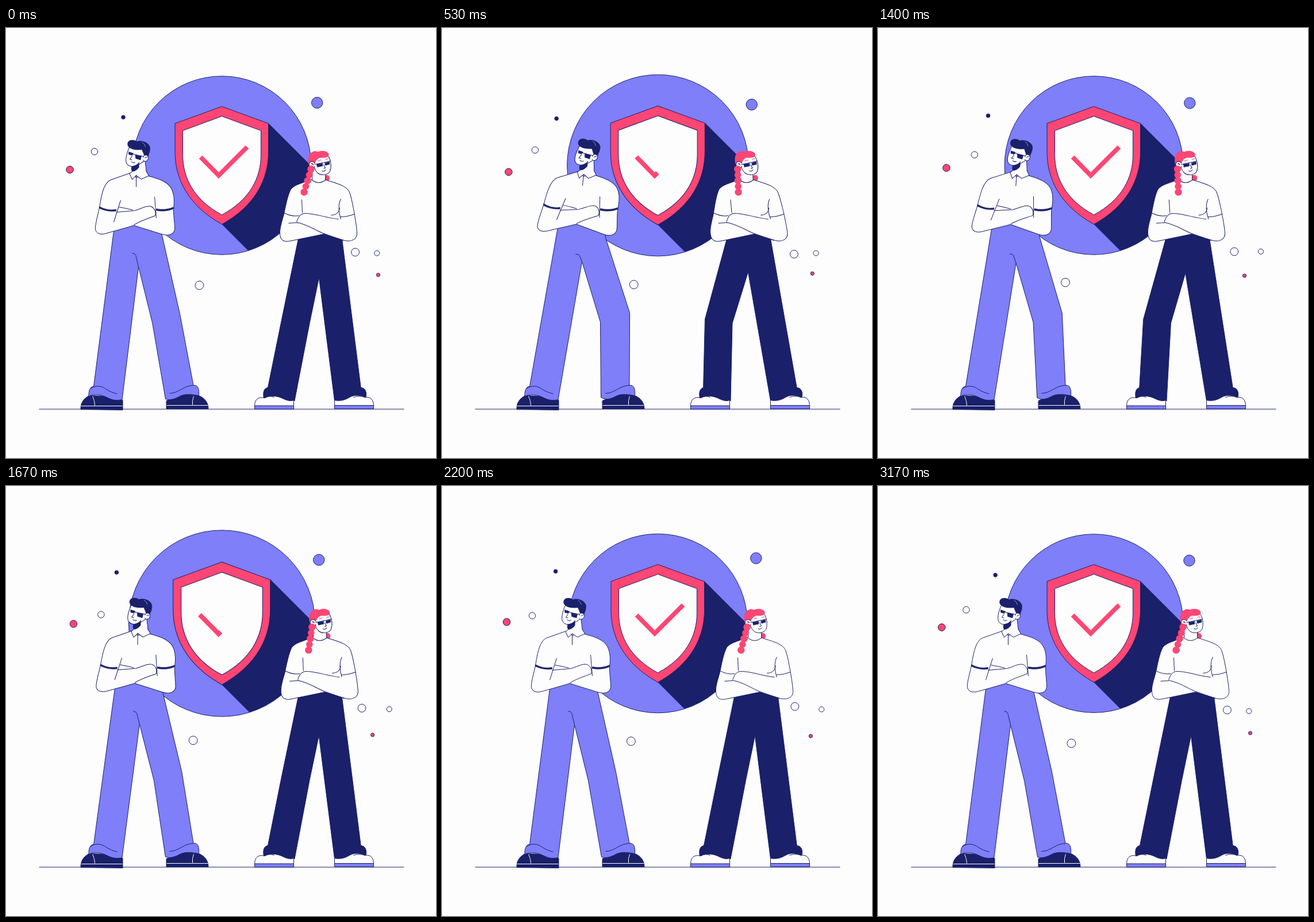
An HTML page with a canvas for the animation above (3210 ms loop, 748 by 748 pixels).

```html
<!DOCTYPE html>
<html lang="en">
<head>
<meta charset="utf-8">
<title>Security team</title>
<style>
html, body { margin: 0; width: 100%; height: 100%; overflow: hidden; background: #fdfdfd; }
canvas { display: block; width: 748px; height: 748px; }
</style>
</head>
<body>
<canvas id="stage" width="748" height="748"></canvas>
<script>
const ctx = document.getElementById('stage').getContext('2d');
const LOOP = 3210, STEPS = 96;
const NAVY = '#1a206a', VIOLET = '#7e7ff9', PINK = '#fe4674', WHITE = '#fdfdfd';

const mix = (a, b, k) => a + (b - a) * k;
const point = (x0, y0, x1, y1, k) => mix(x0, x1, k) + ' ' + mix(y0, y1, k);

// Smooth step from 0 to 1 between two times.
function ease(t, from, to) {
  const u = Math.min(1, Math.max(0, (t - from) / (to - from)));
  return u * u * (3 - 2 * u);
}

// Smooth hump of height 1 around a time.
function bump(t, mid, half) {
  const u = Math.abs(t - mid) / half;
  return u < 1 ? Math.cos(u * Math.PI / 2) ** 2 : 0;
}

// Four heartbeats, the first one weak.
function heartbeat(t) {
  let sum = 0;
  for (let i = 0; i < 4; i++) {
    sum += (i ? 1 : 0.36) * Math.max(0, 10.5 * bump(t, 13 + 20 * i, 10) - 1.5);
  }
  return sum;
}

function pose(t) {
  const back = ease(t, 35, 51), settle = 2 * bump(t, 50, 10);
  return {
    man: 0.74 * (ease(t, 0, 14) - ease(t, 42, 53)) + 0.26 * bump(t, 16, 8),
    hips: ease(t, 0, 15) - back,
    chest: settle - 12 * (ease(t, 0, 22) - back),
    head: settle - 16.3 * (ease(t, 0, 15) - back),
    braid: 518 - 3 * bump(t, 16, 13) + 8 * bump(t, 52, 20)
  };
}

function shape(d, fill, line = NAVY, width = 1) {
  const p = new Path2D(d);
  if (fill) { ctx.fillStyle = fill; ctx.fill(p); }
  if (line) { ctx.strokeStyle = line; ctx.lineWidth = width; ctx.stroke(p); }
}

function dot(x, y, r, fill, line = NAVY) {
  ctx.beginPath();
  ctx.arc(x, y, r, 0, 7);
  ctx.fillStyle = fill;
  ctx.fill();
  if (line) { ctx.strokeStyle = line; ctx.lineWidth = 1; ctx.stroke(); }
}

// Each bubble rides a small ellipse: centre plus cosine and sine parts.
function drawBubbles(t) {
  const c = Math.cos(t / STEPS * 2 * Math.PI), s = Math.sin(t / STEPS * 2 * Math.PI);
  const bubble = (r, fill, x, y, xc, xs, yc, ys) =>
    dot(x + xc * c + xs * s, y + yc * c + ys * s, r, fill);
  bubble(6.3, PINK, 114, 243, -3.4, 3.6, 2.9, 6.3);
  bubble(5.7, WHITE, 159.5, 218.5, -6.1, 5.8, -4, -5.4);
  bubble(3.3, NAVY, 197.5, 152.5, 6, -2.2, 2.2, 4);
  bubble(9.7, VIOLET, 542, 129, -1.3, -3.6, 0.5, 4);
  bubble(7.4, WHITE, 330.5, 444.5, 5.4, 0, 2.6, 0);
  bubble(6.9, WHITE, 613, 388, -5.9, 2.2, 1.5, 4.8);
  bubble(4.5, WHITE, 655.5, 389.5, -10.8, 0, 1.7, 0.9);
  bubble(3.1, PINK, 642, 430.5, 5, -0.9, -1.5, -3.7);
}

function drawTick(part) {
  if (part < 0.01) return;
  const [a, b, c] = [[338, 224], [369.5, 256], [419, 206.5]];
  const first = Math.hypot(b[0] - a[0], b[1] - a[1]);
  const second = Math.hypot(c[0] - b[0], c[1] - b[1]);
  const left = part * (first + second);
  const k = Math.min(1, left / first), q = (left - first) / second;
  ctx.beginPath();
  ctx.moveTo(...a);
  ctx.lineTo(mix(a[0], b[0], k), mix(a[1], b[1], k));
  if (q > 0) ctx.lineTo(mix(b[0], c[0], q), mix(b[1], c[1], q));
  ctx.strokeStyle = PINK;
  ctx.lineWidth = 7.8;
  ctx.stroke();
}

function drawEmblem(t) {
  const grow = heartbeat(t), s = 1 + Math.max(0, grow - 1.2) * 0.0073;
  const zoom = () => {
    ctx.translate(375, 238.5);
    ctx.scale(s, s);
    ctx.translate(-375, -238.5);
  };
  dot(375, 238.5, 155.3 + grow, VIOLET);
  ctx.save();
  ctx.beginPath();
  ctx.arc(375, 238.5, 155 + grow, 0, 7);
  ctx.clip();
  zoom();
  shape('M456 165L616 325L535 501L375 341Z', NAVY, null);
  ctx.restore();

  ctx.save();
  zoom();
  shape('M375 136L456 165.5V215C456 262 434 308 375 341C316 308 293.5 262 293.5 215V165.5Z', PINK);
  shape('M375 153L443 178V220C443 260 424 298 375 324.5C326 298 307 260 307 220V178Z', WHITE);
  drawTick(1 - bump(t, 20, 8.8) - bump(t, 54, 8.8));
  ctx.restore();
}

function drawManLegs(k) {
  const crotch = point(230, 415, 243, 406, k);
  shape('M278.5 662V648C285 645 300 640 310 637L335 639C345 643 351.5 651 351.5 662Z', NAVY);
  shape('M129.5 663C129 651 135 644 144 639L180 640L202.5 647V664Z', NAVY);
  shape('M' + point(184, 338, 202, 338, k) + 'L' + point(187, 352, 201, 346, k)
    + 'L152 623C146 623 143 630 143.5 640C155 635 166 638 175 642C184 647 192 648 201.5 646L' + crotch
    + 'L' + point(254, 512, 275, 511, k) + 'L' + point(277, 645, 276, 642, k)
    + 'C285 648 295 644 302 640C312 635 325 637 335 639C336 627 333 620 325.5 621L'
    + point(302, 497, 326, 495, k) + 'L' + point(270, 356, 284, 364, k)
    + 'L' + point(267, 338, 280, 338, k) + 'Z', VIOLET);
  shape('M' + point(219, 391.5, 232, 393, k) + 'Q' + point(225, 391, 238, 393, k) + ' '
    + point(226, 398, 239, 396, k) + 'L' + crotch);
  shape('M146 627C156 620 166 622 174 628C180 632 186 634 193 636M284 635C300 635 307 622 326 621');
  shape('M130 657H202M279 656H351M150 640Q154 648 154 656M326 640Q323 648 324 655', null, WHITE);
}

function drawManTop(k) {
  ctx.save();
  ctx.transform(1, 0.045 * k, -0.1 * k, 1, 45.5 * k, -12.2 * k);
  // shirt and arms
  shape('M215 252L181 264C169 269 165 293 162 312C158 330 154 343 155 350C157 358 165 359 173 357'
    + 'L222 343L270 358C282 362 292 359 293 349C293 338 291 328 291 316C292 304 293 293 289 283'
    + 'C284 268 267 262 247 257Z', WHITE);
  shape('M162 310Q176 318 191 315V318Q176 320 161.5 313ZM261 314Q277 317 291 311V314Q277 320 261 317Z', NAVY, NAVY, 0.6);
  shape('M199 299L187 337M258 293L261 330M196 311Q208 313 220 316M191 320L224 317'
    + 'C237 313 244 308 252 310C258 313 261 320 259 326C250 330 237 333 222 342');
  // neck and collar
  shape('M220 240L221 254L226 260L244 252L241 228Z', WHITE);
  shape('M221 247L214.5 253L219 263L226 256L235 262.5L248 256.5L243 248M226 257V276', WHITE);
  // head
  shape('M214 207C209 218 206 231 210 236C213 241 219 240 224 241L240 231L247 223V207Z', WHITE);
  shape('M218 240C224 239 229 237 231 232V242C227 247 222 250 219 249C217 247 217 243 218 240Z', NAVY, null);
  shape('M211.5 204C209 195 219 192 227 197C238 194 249 200 250 208C250 214 249 218 246 222'
    + 'L240 221L236 211C226 212 215 211 211.5 204Z', NAVY, NAVY, 0.6);
  shape('M236 198Q241 201 242 206', null, WHITE, 0.5);
  shape('M238 225C239 218 247 220 247 226C246 232 239 233 238 229M241 226Q243 223 245 225', WHITE);
  shape('M213 215L221 217.5L219 221L213 219.5ZM224.5 220L235 222.5L233.5 229L225 226.5Z', NAVY, NAVY, 0.6);
  shape('M220 219L239 223M219 222L215 228L219 229M217 232Q220 235 224 233');
  ctx.restore();
}

function drawWomanLegs(w) {
  const k = Math.sin(w * Math.PI / 2);
  shape('M456 625C448 625 446 634 448 643L470 646ZM616 625C625 625 628 634 625 643L600 646Z', NAVY);
  shape('M' + point(511, 350, 499, 350, w) + 'L' + point(508, 366, 495, 366, w)
    + 'L' + point(479, 507, 457, 506, k) + 'L454 630L453 645L501.5 648L'
    + point(528, 511, 504.5, 513, k) + 'L' + point(544, 434, 532, 424, k)
    + 'L571 648L620 643L617 627L' + point(584, 366, 571, 366, w)
    + 'L' + point(581, 350, 568, 350, w) + 'Z', NAVY);
  shape('M432 657C432 646 438 640 450 643C460 637 474 640 483 645C490 648 495 649 500 647V657Z', WHITE);
  shape('M571 657V647C580 649 589 647 597 642C607 636 618 639 624 642C635 640 639 648 639 657Z', WHITE);
  shape('M432 656.5H500V662.5H432ZM571 656H639V662H571Z', VIOLET);
  shape('M447 643Q458 638 466 642M604 642Q614 638 624 642');
}

function drawWomanTop({ chest, head, braid }) {
  const lean = (head - chest) / 130;
  dot(557 + head * 0.8, 260.5, 5.5, PINK, null);
  ctx.save();
  ctx.transform(1, 0, -lean, 1, chest + lean * 355, 0);
  shape('M532 263C518 268 501 272 495 280C489 291 486 309 483 323C479 338 475 348 476 358'
    + 'C477 370 484 372 494 370L552 358L588 369C601 372 611 367 610 355C609 342 607 332 605.5 322'
    + 'C603 309 601 296 597 285C592 274 575 270 557 264Z', WHITE);
  shape('M514 298L515 321M582 297C577 306 578 321 582 332M565 325C574 325 579 320 580 312'
    + 'M483 321Q496 328 509 326M581 328Q594 328 606 323'
    + 'M491 339L507 338M505 337C508 328 512 321 522 322C541 323 557 330 578 332'
    + 'M507 338C525 342 537 351 552 357L586 369');
  // neck and face
  shape('M533 240L532 264Q543 273 555 264L555 250Z', WHITE);
  shape('M536 225C533 236 536 247 542 252C548 257 560 255 563 249C566 241 565 230 560 222Z', WHITE);
  shape('M527 240C524 232 524 218 533 215C536 213 540 214 542 215C548 212 559 213 561 219'
    + 'C561 225 554 226 546 225C540 227 537 232 536 240Z', PINK, null);
  shape('M537 235C533 229 526 232 527 238C528 243 534 244 537 240M530 236Q533 234 534 238', WHITE);
  shape('M540 236.5L550 235L550.5 239.5L541 241.5ZM554 234.5L562 232L562.5 236.5L555 238.5Z', NAVY, NAVY, 0.6);
  shape('M536 237L564 231M552 237L555 243L552 244M549 248Q553 250 556 246');
  shape('M542 231L548 229M555 228L560 227', null, PINK);
  ctx.restore();
  for (let i = 0; i < 5; i++) {
    dot(mix(530 + head, braid, i / 4), 245 + 10 * i, 6.2 - (i % 2) * 0.4, PINK, null);
  }
}

function draw(ms) {
  const t = (ms % LOOP) / LOOP * STEPS, p = pose(t);
  ctx.setTransform(1, 0, 0, 1, 0, 0);
  ctx.fillStyle = WHITE;
  ctx.fillRect(0, 0, 748, 748);
  ctx.translate(0.5, 0.5);
  drawEmblem(t);
  drawBubbles(t);
  shape('M57 662.5H692');
  drawManLegs(p.man);
  drawManTop(p.man);
  drawWomanLegs(p.hips);
  drawWomanTop(p);
}

const start = performance.now();
function tick() {
  draw(performance.now() - start);
  requestAnimationFrame(tick);
}
tick();
</script>
</body>
</html>
```
